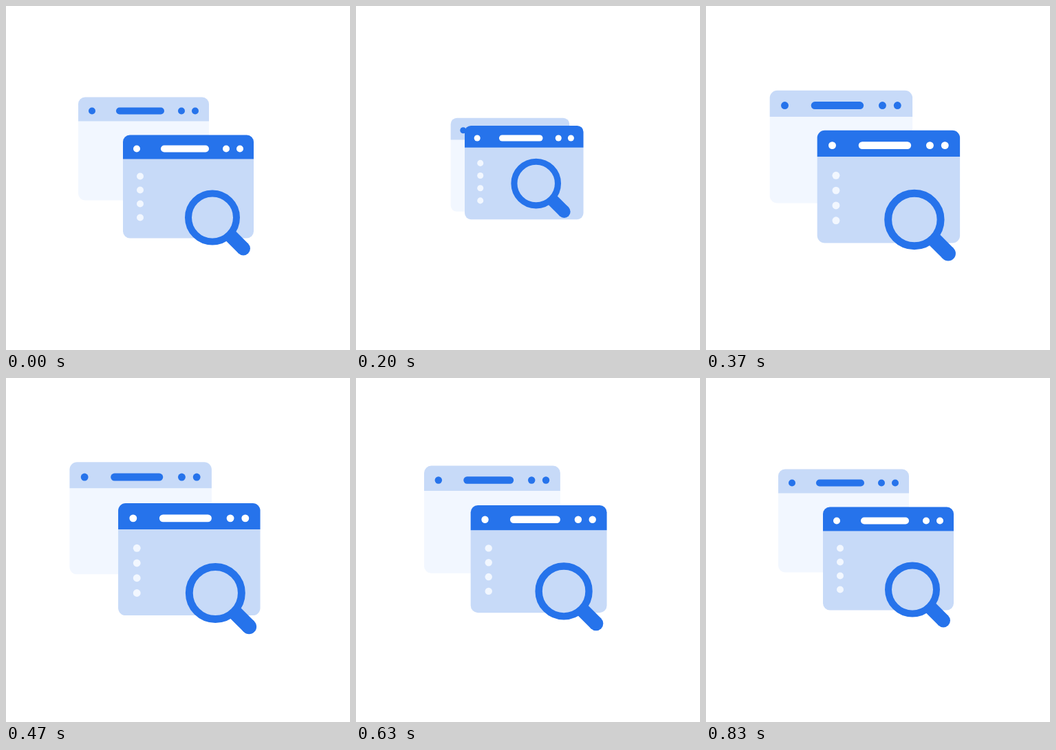
Write an HTML page that moves like this. It is 500 px wide and 500 px high and loops after 1010 ms.

```html
<!DOCTYPE html>
<html lang="en">
<head>
<meta charset="utf-8">
<title>Window search</title>
<style>
  html, body { margin: 0; width: 100%; height: 100%; overflow: hidden; background: #fff; }
  svg { display: block; width: 100%; height: 100%; }
</style>
</head>
<body>
<svg viewBox="0 0 500 500">
  <defs>
    <path id="body" d="M0 35H190V140a10 10 0 0 1-10 10H10a10 10 0 0 1-10-10z"/>
    <path id="bar" d="M0 35V10A10 10 0 0 1 10 0H180a10 10 0 0 1 10 10V35z"/>
    <g id="controls">
      <circle cx="20" cy="20" r="5"/>
      <rect x="55" y="15" width="70" height="10" rx="5"/>
      <circle cx="150" cy="20" r="5"/>
      <circle cx="170" cy="20" r="5"/>
    </g>
  </defs>
  <g id="scene">
    <g id="back">
      <use href="#body" fill="#f2f7ff"/>
      <use href="#bar" fill="#c7daf8"/>
      <use href="#controls" fill="#2673eb"/>
    </g>
    <g id="front">
      <use href="#body" fill="#c7daf8"/>
      <use href="#bar" fill="#2673eb"/>
      <use href="#controls" fill="#fff"/>
      <g fill="#f2f7ff">
        <circle cx="25" cy="60" r="5"/>
        <circle cx="25" cy="80" r="5"/>
        <circle cx="25" cy="100" r="5"/>
        <circle cx="25" cy="120" r="5"/>
      </g>
    </g>
    <g id="lens" fill="none" stroke="#2673eb">
      <circle r="35" stroke-width="10"/>
      <path d="M27 27L45 45" stroke-width="20"/>
      <circle cx="45" cy="45" r="10" fill="#2673eb" stroke="none"/>
    </g>
  </g>
</svg>
<script>
const LOOP = 1010, FPS = 30;
const SQUEEZED = 5, STRETCHED = 12, SETTLED = 25; // pose times, in steps

const $ = id => document.getElementById(id);
const move = (id, x, y) => $(id).setAttribute('transform', `translate(${x} ${y})`);

// cubic-bezier easing, solved by bisection
function bezier(x1, y1, x2, y2) {
  const curve = (a, b, u) => 3 * (1 - u) * u * ((1 - u) * a + u * b) + u ** 3;
  return x => {
    let lo = 0, hi = 1;
    for (let i = 0; i < 30; i++) {
      const mid = (lo + hi) / 2;
      if (curve(x1, x2, mid) < x) lo = mid; else hi = mid;
    }
    return curve(y1, y2, (lo + hi) / 2);
  };
}

const easeOut = bezier(0, 0, 0.58, 1);
const easeInOut = bezier(0.42, 0, 0.58, 1);
const settle = bezier(1 / 3, 0.233, 2 / 3, 0.867);

function pose(n) {
  if (n < SQUEEZED) {
    const p = easeOut(n / SQUEEZED);
    return { scale: 1 - 0.1 * p, gather: p };
  }
  if (n < STRETCHED) {
    const p = easeInOut((n - SQUEEZED) / (STRETCHED - SQUEEZED));
    return { scale: 0.9 + 0.2 * p, gather: 1 - p };
  }
  const p = settle(Math.min(1, (n - STRETCHED) / (SETTLED - STRETCHED)));
  return { scale: 1.1 - 0.1 * p, gather: 0 };
}

function draw(now) {
  const t = now % LOOP;
  const step = Math.floor((Math.floor(t / 10) * 10 + 5) * FPS / 1000);
  const { scale, gather } = pose(step);
  const d = 22.2 * gather;
  $('scene').setAttribute('transform', `translate(250 250) scale(${scale}) translate(-250 -250)`);
  move('back', 105 + d, 132.5 + d);
  move('front', 170 - d, 187.5 - d);
  move('lens', 300 - 38.7 * gather, 307.5 - 50.7 * gather);
}

const start = performance.now();
function tick() {
  draw(performance.now() - start);
  requestAnimationFrame(tick);
}
tick();
</script>
</body>
</html>
```
